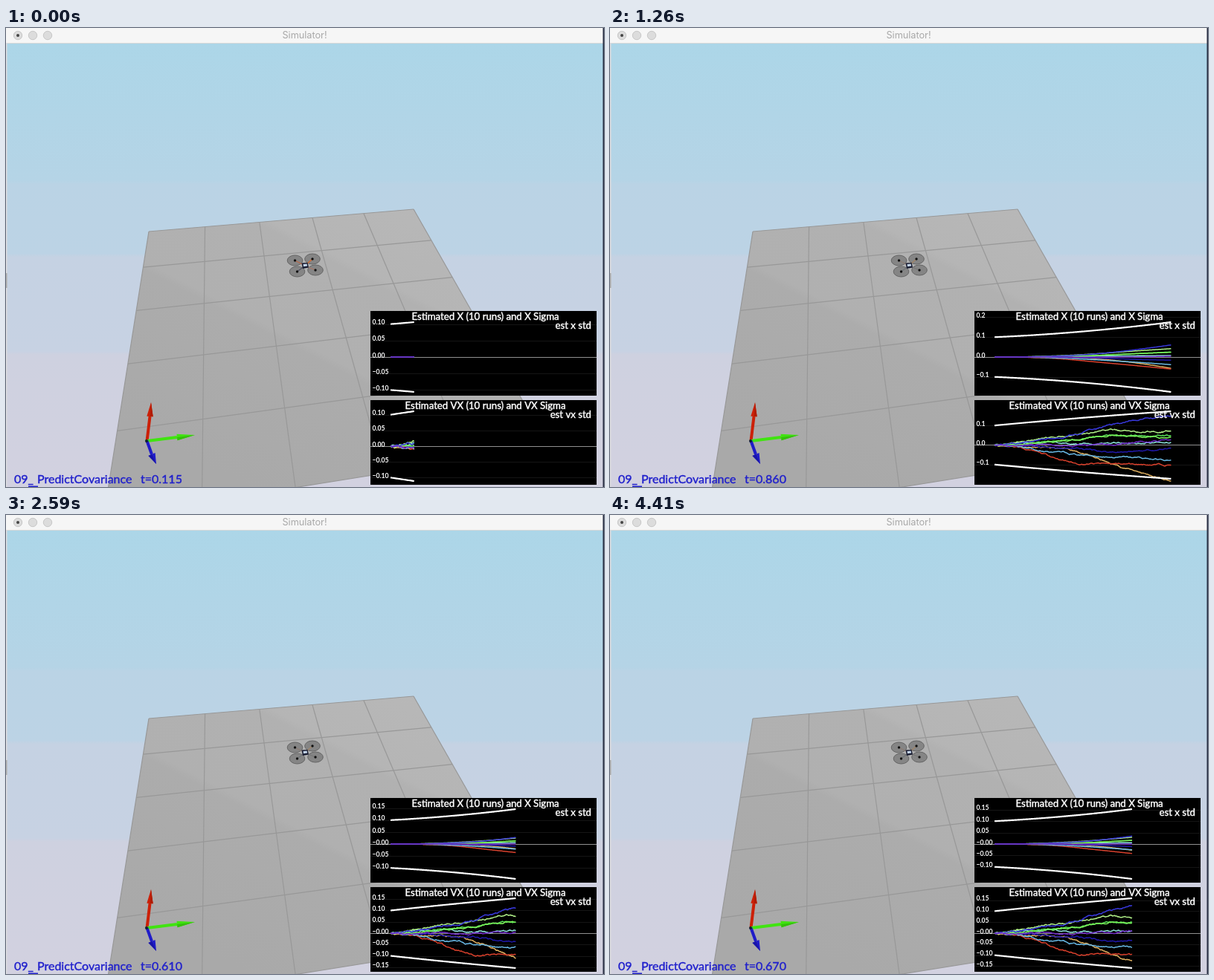
An HTML page with a canvas for the animation above (4480 ms loop, 804 by 618 pixels).

```html
<!DOCTYPE html>
<html lang="en">
<head>
<meta charset="utf-8">
<title>Simulator</title>
<style>
html, body { margin: 0; width: 804px; height: 618px; overflow: hidden; }
canvas { display: block; }
</style>
</head>
<body>
<canvas id="stage" width="804" height="618"></canvas>
<script>
const ctx = document.getElementById('stage').getContext('2d');
const STEP = 0.005, SAMPLES = 201, PERIOD = 1.03, FRAME = 70, FRAMES = 64;

// ---------- helpers ----------
function lerpKnots(xs, ys, x) {
  let i = 1;
  while (i < xs.length - 1 && x > xs[i]) i++;
  return ys[i - 1] + (ys[i] - ys[i - 1]) * (x - xs[i - 1]) / (xs[i] - xs[i - 1]);
}
function line(points, color, width) {
  ctx.beginPath();
  points.forEach(p => ctx.lineTo(p[0], p[1]));
  ctx.strokeStyle = color;
  ctx.lineWidth = width;
  ctx.stroke();
}
function polygon(points, fill) {
  ctx.beginPath();
  points.forEach(p => ctx.lineTo(p[0], p[1]));
  ctx.closePath();
  ctx.fillStyle = fill;
  ctx.fill();
}
function ellipse(x, y, rx, ry, fill, stroke) {
  ctx.beginPath();
  ctx.ellipse(x, y, rx, ry, 0, 0, 7);
  ctx.fillStyle = fill;
  ctx.fill();
  if (stroke) { ctx.strokeStyle = stroke; ctx.lineWidth = 1; ctx.stroke(); }
}
function rect(x, y, w, h, fill) {
  ctx.fillStyle = fill;
  ctx.fillRect(x, y, w, h);
}
function text(str, x, y, font, color, align = 'left', weight = 0) {
  ctx.font = font;
  ctx.fillStyle = ctx.strokeStyle = color;
  ctx.textAlign = align;
  ctx.textBaseline = 'middle';
  ctx.fillText(str, x, y);
  if (weight) { ctx.lineWidth = weight; ctx.strokeText(str, x, y); }
}
function gradient(x0, y0, x1, y1, stops) {
  const g = ctx.createLinearGradient(x0, y0, x1, y1);
  stops.forEach(s => g.addColorStop(s[0], s[1]));
  return g;
}

// ---------- estimated runs ----------
// velocity in thousandths at the knot times
const knotTimes = [0, 0.12, 0.25, 0.4, 0.56, 0.7, 0.92];
const runs = [
  ['#e0b060', -5, -15, -30, -95, -135, -205],
  ['#d8402c', -12, -52, -95, -97, -98, -100],
  ['#68b8e4', -8, -33, -50, -60, -66, -85],
  ['#2018a8', -3, -12, -15, -35, -30, -10],
  ['#90e8e0', 6, 10, 5, 15, 12, 20],
  ['#58e058', 5, 17, 35, 45, 50, 45],
  ['#78f058', 3, 14, 30, 48, 42, 38],
  ['#b0f088', 15, 38, 55, 78, 66, 75],
  ['#3838dc', 8, 30, 55, 100, 130, 152],
  ['#7028c8', 2, -2, -3, 0, 15, 28]
];
let seed = 11;
const random = () => (seed = seed * 16807 % 2147483647) / 2147483647;

const velocities = [], positions = [];
for (const [color, ...knots] of runs) {
  const v = [], x = [];
  let drift = 0, sum = 0;
  for (let i = 0; i < SAMPLES; i++) {
    if (i) drift = drift * 0.9 + (random() - 0.5) * 0.0055;
    const value = lerpKnots(knotTimes, [0, ...knots], i * STEP) / 1000 + drift;
    sum += value * STEP;
    v.push(value);
    x.push(sum);
  }
  velocities.push(v);
  positions.push(x);
}
const sigmaX = t => 0.1 + 0.045 * t + 0.05 * t * t;
const sigmaV = t => 0.1 + 0.098 * t - 0.0155 * t * t;

function plot(top, title, legend, data, sigma, t) {
  const count = Math.min(SAMPLES, Math.round(t / STEP) + 1);
  let high = sigma(t), low = -high;
  for (const run of data)
    for (let i = 0; i < count; i++) {
      high = Math.max(high, run[i]);
      low = Math.min(low, run[i]);
    }
  const scale = 94 / (high - low);
  const toY = v => top + 15 + (high - v) * scale;
  const trace = fn => Array.from({ length: count }, (_, i) => [517 + i * STEP * 276, toY(fn(i))]);

  ctx.save();
  ctx.beginPath();
  ctx.rect(490, top, 304, 114);
  ctx.clip();
  rect(490, top, 304, 114, '#000');

  const coarse = high - low > 0.34;
  const step = coarse ? 0.1 : 0.05;
  const ticks = [];
  for (let k = -4; k <= 4; k++) {
    const y = toY(k * step);
    if (y >= top + 8 && y <= top + 108) ticks.push([k, y]);
  }
  const signedZero = !coarse && ticks.some(tick => tick[0] === 3);
  for (const [k, y] of ticks)
    rect(490, Math.round(y), 304, 1, k ? '#151515' : '#909090');

  data.forEach((run, r) => line(trace(i => run[i]), runs[r][0], 1.5));
  for (const sign of [1, -1])
    line(trace(i => sign * sigma(i * STEP)), '#fff', 2.2);

  for (const [k, y] of ticks) {
    const sign = k < 0 || (k === 0 && signedZero) ? '−' : '';
    text(sign + Math.abs(k * step).toFixed(coarse ? 1 : 2), 492.5, y - 2,
      'bold 8.6px Lato, sans-serif', '#fff');
  }
  const font = '13.2px Lato, sans-serif';
  text(title, 644.5, top + 8, font, '#fff', 'center', 0.45);
  text(legend, 787, top + 20, font, '#fff', 'right', 0.45);
  ctx.restore();
}

// ---------- scene ----------
const corners = [[192, 274], [548, 244], [730, 564], [131, 660]];
const ground = (() => {
  const [[x0, y0], [x1, y1], [x2, y2], [x3, y3]] = corners;
  const ax = x1 - x2, bx = x3 - x2, sx = x0 - x1 + x2 - x3;
  const ay = y1 - y2, by = y3 - y2, sy = y0 - y1 + y2 - y3;
  const det = ax * by - bx * ay;
  const g = (sx * by - bx * sy) / det, h = (ax * sy - sx * ay) / det;
  return (u, v) => {
    const w = 1 + g * u + h * v;
    return [
      (x0 + (x1 - x0 + g * x1) * u + (x3 - x0 + h * x3) * v) / w,
      (y0 + (y1 - y0 + g * y1) * u + (y3 - y0 + h * y3) * v) / w
    ];
  };
})();

function drawWorld() {
  rect(0, 20, 804, 598, gradient(0, 20, 0, 618, [
    [0, '#acd6e8'], [0.31, '#b5d4e6'], [0.318, '#bad3e5'],
    [0.474, '#bcd3e5'], [0.482, '#c5d2e3'], [0.694, '#c7d2e3'],
    [0.702, '#ced1e0'], [1, '#d2d1e0']
  ]));
  polygon(corners, gradient(98, 500, 328, 55, [
    [0, '#a9a9a9'], [0.39, '#acacac'], [0.41, '#b0b0b0'],
    [0.64, '#b1b1b1'], [0.66, '#b5b5b5'], [1, '#b9b9b9']
  ]));
  for (let i = 0; i <= 5; i++) {
    line([ground(i / 5, 0), ground(i / 5, 1)], '#989898', 1.2);
    line([ground(0, i / 5), ground(1, i / 5)], '#989898', 1.2);
  }
}

function drawDrone(t) {
  const rotors = [[388.5, 313], [412, 311], [391.5, 328], [416, 326]];
  for (const [x, y] of rotors) ellipse(x, y, 10.3, 7, '#858585', '#646464');
  const arms = t < 0.3 ? ['#b86848', '#d86a30', '#556', '#a87868'] : ['#8c7c74', '#a08468', '#707478', '#777'];
  rotors.forEach((p, i) => line([[402, 320], p], arms[i], 1.3));
  for (const [x, y] of rotors) ellipse(x, y, 1.7, 1.7, '#111');
  polygon([[397.5, 316.5], [405.5, 316], [407, 322.5], [399, 324]], '#181c30');
  polygon([[399.5, 318], [404.5, 317.6], [405.2, 320.6], [400, 321.2]], '#c4d4ec');
}

function arrow(x, y, baseX, baseY, tipX, tipY, half, color, dark) {
  const len = Math.hypot(tipX - baseX, tipY - baseY);
  const nx = -(tipY - baseY) / len * half, ny = (tipX - baseX) / len * half;
  line([[x, y], [baseX, baseY]], color, 4);
  polygon([[baseX + nx, baseY + ny], [tipX, tipY], [baseX - nx, baseY - ny]], color);
  polygon([[baseX + nx, baseY + ny], [tipX, tipY], [baseX, baseY]], dark);
}

function drawWindow() {
  rect(0, 0, 804, 20, '#f6f6f6');
  rect(0, 20, 804, 1, '#d8d8d8');
  for (const x of [16, 36, 56]) ellipse(x, 10, 5.7, 5.7, '#dcdcdc', '#c8c8c8');
  ellipse(16, 10, 2, 2, '#444');
  text('Simulator!', 401.5, 10.5, '12.7px Inter, sans-serif', '#a8a8a8', 'center');
  rect(0, 20, 1.5, 598, '#dcdce0');
  rect(0, 330, 1.5, 20, '#aaa');
  rect(802.5, 0, 1.5, 618, '#242b40');
}

// ---------- clock ----------
const clockFrames = [0, 11, 26, 37, 44, 53, 63];
const clockValues = [0.115, 0.56, 1.2, 1.64, 1.95, 2.31, 2.73];

function draw(now) {
  const frame = Math.floor(now / FRAME) % FRAMES;
  const raw = lerpKnots(clockFrames, clockValues, frame) % PERIOD;
  const t = Math.min(1, Math.round(raw / STEP) * STEP);

  drawWorld();
  drawDrone(t);
  arrow(189.5, 556, 193.5, 523, 195, 504, 4.2, '#cc2008', '#b01c04');
  arrow(189.5, 556, 230, 551, 254, 548, 4.2, '#40e410', '#34c00c');
  arrow(189.5, 556, 196, 574, 202, 587, 5, '#201cc8', '#1814a8');
  ellipse(189, 556, 2, 2, '#102030');

  const label = (str, x) => text(str, x, 608, '16px Lato, sans-serif', '#2020cc', 'left', 0.4);
  label('09_', 11);
  label('PredictCovariance', 42);
  label('t=' + t.toFixed(3), 181);
  rect(30, 616.5, 13, 1.5, '#2020cc');

  plot(381, 'Estimated X (10 runs) and X Sigma', 'est x std', positions, sigmaX, t);
  plot(501, 'Estimated VX (10 runs) and VX Sigma', 'est vx std', velocities, sigmaV, t);
  drawWindow();
  requestAnimationFrame(() => draw(performance.now()));
}
draw(performance.now());
</script>
</body>
</html>
```
